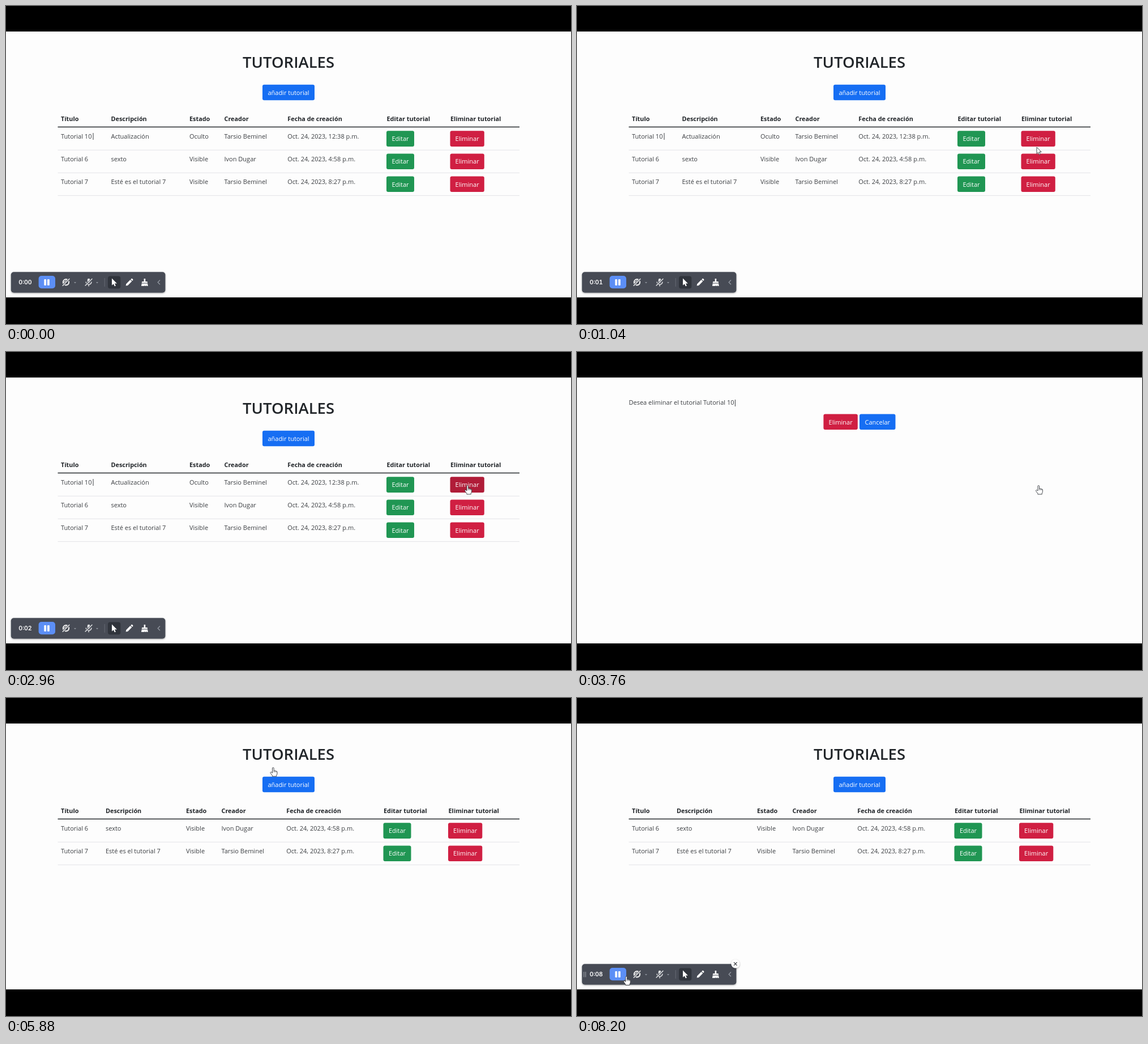
Animation of 998x561 px, one loop 8.4 s. Source, as an HTML page:

```html
<!DOCTYPE html>
<html lang="es">
<head>
<meta charset="utf-8">
<title>Tutoriales</title>
<style>
  html, body { margin: 0; width: 100%; height: 100%; overflow: hidden; background: #000; }
  svg { display: block; width: 998px; height: 561px; }
  text { font: 11px "Open Sans", "Noto Sans", sans-serif; fill: #3b3e42; white-space: pre; }
  .title { font-size: 27.5px; font-weight: 600; fill: #212529; text-anchor: middle; }
  .head { font-size: 10.85px; font-weight: 700; fill: #212529; }
  .label { fill: #fff; text-anchor: middle; }
  .timer { font: 600 10.6px Inter, Roboto, sans-serif; font-variant-numeric: tabular-nums; fill: #fff; }
  .pointer { stroke: #33363c; stroke-width: .9; fill: #fff; stroke-linejoin: round; }
</style>
</head>
<body>
<svg id="stage" viewBox="0 0 998 561"></svg>
<script>
const LOOP = 8400, STEP = 40, LAST = 8200;
const RED = '#d01f42', RED_HOVER = '#c01e3e', RED_DOWN = '#b01c38';
const GREEN = '#209653', BLUE = '#166ef3', BLUE_HOVER = '#135fd0';

const rect = (x, y, w, h, fill, extra = '') =>
  `<rect x="${x}" y="${y}" width="${w}" height="${h}" fill="${fill}" ${extra}/>`;
const text = (x, y, str, cls = '', id = '') =>
  `<text x="${x}" y="${y}" class="${cls}" id="${id}">${str}</text>`;
const group = (id, body, extra = '') => `<g id="${id}" ${extra}>${body}</g>`;
const button = (x, y, w, label, fill, id = '') =>
  rect(x, y, w, 27.6, fill, `rx="3" id="${id}"`) + text(x + w / 2, y + 18, label, 'label');

const HEADS = ['Título', 'Descripción', 'Estado', 'Creador', 'Fecha de creación',
  'Editar tutorial', 'Eliminar tutorial'];
const ROWS = [
  ['Tutorial 10', 'Actualización', 'Oculto', 'Tarsio Beminel', 'Oct. 24, 2023, 12:38 p.m.'],
  ['Tutorial 6', 'sexto', 'Visible', 'Ivon Dugar', 'Oct. 24, 2023, 4:58 p.m.'],
  ['Tutorial 7', 'Esté es el tutorial 7', 'Visible', 'Tarsio Beminel', 'Oct. 24, 2023, 8:27 p.m.'],
];

function listPage(name, cols, rows) {
  let out = text(499, 109, 'TUTORIALES', 'title')
    + button(453, 138.7, 92, 'añadir tutorial', BLUE, name + 'Add')
    + HEADS.map((h, i) => text(cols[i], 202.7, h, 'head')).join('')
    + rect(91.5, 212.7, 815.5, 1.5, '#24282c');
  rows.forEach((row, r) => {
    const y = 220.3 + r * 40.1;
    out += row.map((cell, i) => text(cols[i], y + 13.4, cell)).join('')
      + button(cols[5] - .5, y, 49, 'Editar', GREEN)
      + button(cols[6] - .5, y, 60.3, 'Eliminar', RED, `${name}Del${r}`)
      + rect(91.5, y + 33.4, 815.5, .9, '#e0e2e4');
  });
  return out;
}

const confirmPage = text(91.5, 93.4, 'Desea eliminar el tutorial Tutorial 10')
  + rect(278.9, 84, 1, 12, '#3b3e42')
  + button(435.4, 109.5, 60.4, 'Eliminar', RED, 'confirmDel')
  + button(499, 109.5, 63.5, 'Cancelar', BLUE);

const caret = x => `<path d="M${x - 2} 487h4l-2 2.6z" fill="#8d929b"/>`;
const toolbar = rect(8.8, 469.3, 272.6, 36.4, '#464b55', 'rx="5" filter="url(#shadow)"')
  + text(22.3, 491, '0:00', 'timer', 'timer')
  + rect(57.6, 476, 29.4, 22.3, '#5c8ff6', 'rx="5"')
  + rect(67.3, 482, 3.8, 11, '#fff', 'rx="1"') + rect(73, 482, 3.8, 11, '#fff', 'rx="1"')
  // camera off
  + `<circle cx="106" cy="487.3" r="5.1" fill="none" stroke="#eee" stroke-width="2.2"/>
     <path d="M102 487l5-4 3.5 1-6 7z" fill="#eee"/>
     <path d="M99.5 494l13-13" stroke="#464b55" stroke-width="3.4"/>
     <path d="M99.8 493.7l12.5-12.7" stroke="#eee" stroke-width="1.5"/>` + caret(122)
  // microphone off
  + rect(143.8, 480.8, 4.6, 8.2, '#e6e7e9', 'rx="2.3"')
  + `<path d="M141.2 486.5a4.9 4.9 0 0 0 9.8 0M146.1 491.4v3" fill="none" stroke="#e6e7e9" stroke-width="1.4"/>
     <path d="M139.5 493.3l13-12.3" stroke="#464b55" stroke-width="3"/>
     <path d="M139.7 493.5l12.7-12.5" stroke="#e6e7e9" stroke-width="1.4"/>` + caret(161)
  + rect(173.7, 480, 1, 15, '#676c75')
  + rect(180, 476.5, 22.3, 22, '#30343c', 'rx="4"')
  + `<path d="M187 480.5v12.3l2.9-2.6 2 4.3 2-.9-2-4.2h4z" fill="#fff"/>
     <path d="M211.6 493.6l.7-3.4 7.2-7.2 2.8 2.8-7.2 7.2zM220.3 482.2l1.2-1.1q.8-.6 1.5 0l1.2 1.2q.6.7 0 1.5l-1.1 1.2z" fill="#fff"/>
     <path d="M243.6 481h2.6v5h2.4q1.4 0 1.4 1.4v1.2h-10.2v-1.2q0-1.4 1.4-1.4h2.4zM239.7 489.5h10.4l.6 4.5h-2.4l-.6-2-.4 2h-2.3l-.4-2-.4 2h-5.2z" fill="#fff"/>
     <path d="M272 483.5l-3.8 3.9 3.8 3.9" fill="none" stroke="#969ba4" stroke-width="1.3"/>`
  + group('barHover', rect(11.7, 483, 1, 9.5, '#a4a8af') + rect(14.7, 483, 1, 9.5, '#a4a8af')
    + `<circle cx="279.8" cy="469" r="7.4" fill="#fff" filter="url(#shadow)"/>
       <path d="M277 466.2l5.6 5.6m0-5.6l-5.6 5.6" stroke="#33363c" stroke-width="1.2"/>`);

const arrow = '<path class="pointer" d="M0 0V11.6L2.7 9.2 4.6 13.4 6.5 12.5 4.6 8.5H8.2Z"/>';
const hand = `<path class="pointer" d="M-1.5 1Q-1.4-.3-.2-.3 1-.3 1.1 1V5.2Q2.4 4.4 3.2 5.6 4.6 4.9 5.3 6.2
  7 5.8 7 7.5V10Q7 12 5.8 13.4V15.2H-1.6V13.8L-4.7 9.6Q-5.4 8.2-4.2 7.6-3 7.3-1.5 9.2Z"/>
  <path d="M1.1 5.2V8M3.2 5.6V8M5.3 6.2V8.2" stroke="#33363c" stroke-width=".7"/>`;

const stage = document.getElementById('stage');
stage.innerHTML = `<defs>
    <filter id="shadow" x="-20%" y="-40%" width="140%" height="180%">
      <feDropShadow dx="0" dy="1" stdDeviation="1.5" flood-opacity=".35"/></filter>
    <clipPath id="page"><rect y="45" width="998" height="469.3"/></clipPath>
  </defs>` + rect(0, 0, 998, 561, '#000')
  + group('view', rect(0, 45, 998, 469.3, '#fdfdfd')
    + group('before', listPage('before', [97, 185.5, 324, 385.5, 497.3, 672.5, 785], ROWS)
      + rect(153.5, 224, 1, 12, '#3b3e42'))
    + group('confirm', confirmPage)
    + group('after', listPage('after', [97, 176, 318, 380.5, 495.3, 667, 781.5], ROWS.slice(1)))
    + group('bar', toolbar)
    + group('cursor', group('arrow', arrow) + group('hand', hand)), 'clip-path="url(#page)"');

const el = {};
stage.querySelectorAll('[id]').forEach(n => { if (n.id) el[n.id] = n; });

// time, x, y of the pointer tip
const PATH = [
  [560, 842, 520], [960, 812, 249], [1160, 812, 249], [1400, 815.5, 235.8],
  [3900, 815.5, 235.8], [4360, 482, 140], [4560, 472, 123], [7240, 472, 123],
  [7600, 330, 330], [7840, 120, 480], [8040, 87.3, 491.3], [LOOP, 87.3, 491.3],
];
const HANDS = [[1320, 3920], [4400, 7280], [7840, LOOP]];

const within = (t, a, b) => t >= a && t < b;
const show = (node, on) => node.setAttribute('visibility', on ? 'inherit' : 'hidden');
const ease = u => u * u * (3 - 2 * u);

function pointerAt(t) {
  const i = PATH.findIndex(p => p[0] > t);
  if (i < 1) return PATH[0].slice(1);
  const [t0, x0, y0] = PATH[i - 1], [t1, x1, y1] = PATH[i];
  const u = ease((t - t0) / (t1 - t0));
  return [x0 + (x1 - x0) * u, y0 + (y1 - y0) * u];
}

function draw(t) {
  show(el.before, t < 3600);
  show(el.confirm, within(t, 3600, 5560));
  show(el.after, t >= 5560);
  show(el.bar, !within(t, 3600, 4240) && !within(t, 5560, 6040));
  show(el.barHover, t >= 7800);
  el.timer.textContent = '0:0' + Math.floor(t / 1000);

  const [x, y] = pointerAt(t);
  const isHand = HANDS.some(([a, b]) => within(t, a, b));
  el.cursor.setAttribute('transform', `translate(${x} ${y})`);
  show(el.cursor, t >= 560);
  show(el.hand, isHand);
  show(el.arrow, !isHand);

  el.beforeDel0.setAttribute('fill', t < 1320 ? RED : t < 2880 ? RED_HOVER : RED_DOWN);
  el.confirmDel.setAttribute('fill', t < 4440 ? RED : t < 5320 ? RED_HOVER : RED_DOWN);
  const overAdd = t > 7240 && within(x, 453, 545) && within(y, 139, 166);
  el.afterAdd.setAttribute('fill', overAdd ? BLUE_HOVER : BLUE);
}

const start = performance.now();
function tick() {
  const t = (performance.now() - start) % LOOP;
  draw(Math.min(LAST, Math.floor(t / STEP) * STEP));
  requestAnimationFrame(tick);
}
tick();
</script>
</body>
</html>
```
